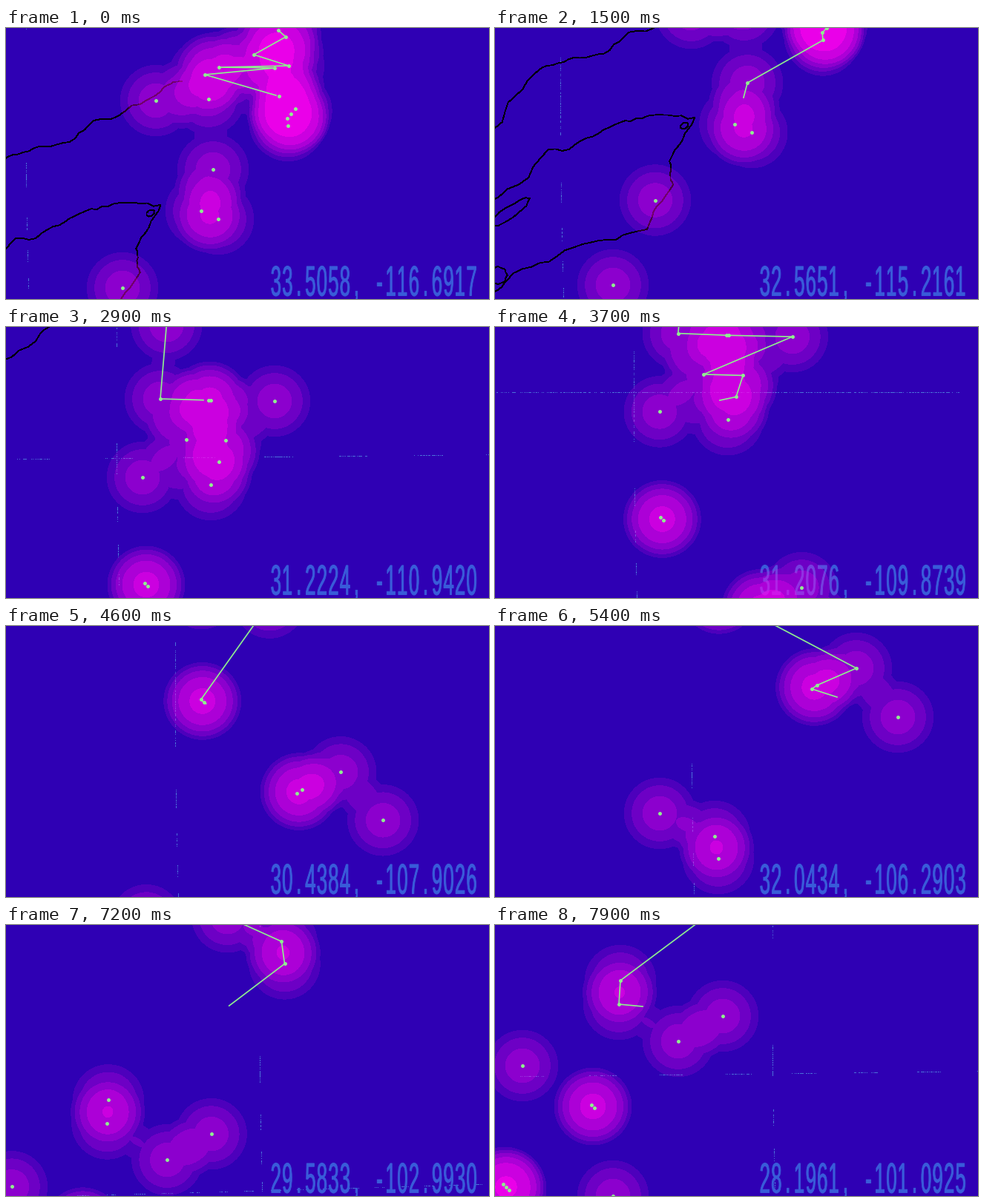
A matplotlib script that plays this animation: 651x366 px, repeating every 8000 ms.

```python
import numpy as np
import matplotlib.pyplot as plt
from matplotlib.animation import FuncAnimation
from matplotlib.patches import PathPatch
from matplotlib.path import Path
from matplotlib.textpath import TextPath
from matplotlib.transforms import Affine2D

W, H, DPI = 651, 366, 64
FRAMES, STEP = 80, 100
PX = 72 / DPI
DEG = 96.5                      # pixels per degree of latitude
R = DEG * 180 / np.pi
CX, CY = W / 2, H / 4           # where the camera looks at the globe
REACH2, PEAK, LEVELS = 3215, 0.515, 7

BACK = "#2f00b4"
INK = "#395cd9"
GREEN = "#90ee90"
GRID = "#4b70d8"

# time, latitude and longitude of the traveller, and its place on screen
KEYS = [
    (0.0, 33.5058, -116.6917, 364, 91),
    (1.5, 32.5651, -115.2161, 335, 94),
    (2.9, 31.2224, -110.9420, 266, 98.7),
    (3.7, 31.2076, -109.8739, 303, 99),
    (5.4, 32.0434, -106.2903, 461, 96),
    (6.5, 30.1782, -104.6920, 326, 102),
    (7.9, 28.1961, -101.0925, 199, 110),
]

# stops on screen at the given key: x, y and, for a close row, count and step
STOPS = {
    0: [(367, 3), (377, 12), (334, 36), (381, 51), (287, 53), (362, 54),
        (268, 63), (368, 92), (273, 96), (202, 98), (390, 109, 3, -5.5, 6.5),
        (380, 132), (279, 191), (263, 247), (286, 258), (157, 351)],
    1: [(159, 347)],
    2: [(208, 97), (273, 99), (276, 99), (362, 100), (243, 152), (296, 153),
        (287, 182), (184, 203), (276, 213), (187, 346, 2)],
    4: [(487, 57), (434, 80), (427, 85), (543, 123), (222, 253), (296, 284),
        (301, 314)],
    6: [(169, 75), (167, 107), (307, 123), (247, 157), (37, 190),
        (130, 243, 2), (11, 350, 3), (159, 366)],
}


def row(x, y, n=1, dx=4, dy=4):
    return [(x + i * dx, y + i * dy) for i in range(n)]


def rough(pts, rng, depth=3, amp=0.07):
    """Fractal coast: push the middle of every piece sideways, repeatedly."""
    pts = np.array(pts, float)
    for _ in range(depth):
        d = np.diff(pts, axis=0)
        push = rng.normal(0, amp, (len(d), 1))
        mids = pts[:-1] + d / 2 + push * np.column_stack([-d[:, 1], d[:, 0]])
        pts = np.insert(pts, np.arange(1, len(pts)), mids, axis=0)
    return pts


def island(x, y, a, b, tilt):
    u = np.linspace(0, 2 * np.pi, 9)
    z = (a * np.cos(u) + 1j * b * np.sin(u)) * np.exp(1j * np.radians(tilt))
    return np.column_stack([x + z.real, y + z.imag])


def project(lat, lon, cam):
    lat, lat0 = np.radians(lat), np.radians(cam[0])
    d = np.radians(lon - cam[1])
    north = np.sin(lat) * np.cos(lat0) - np.cos(lat) * np.sin(lat0) * np.cos(d)
    return CX + R * north, CY + R * np.cos(lat) * np.sin(d)


def unproject(xy, cam):
    x, y = np.asarray(xy, float).T
    north, east, lat0 = (x - CX) / R, (y - CY) / R, np.radians(cam[0])
    depth = np.sqrt(1 - north**2 - east**2)
    lat = np.arcsin(north * np.cos(lat0) + depth * np.sin(lat0))
    lon = np.arctan2(east, depth * np.cos(lat0) - north * np.sin(lat0))
    return np.column_stack([np.degrees(lat), cam[1] + np.degrees(lon)])


def aim(lat, lon, x, y):
    """Camera that shows the given place at pixel x, y."""
    cam = np.array([lat, lon])
    for _ in range(20):
        px, py = project(lat, lon, cam)
        cam += (px - x) / DEG, (py - y) / (DEG * np.cos(np.radians(lat)))
    return cam


times = np.array([k[0] for k in KEYS])
heads = np.array([k[1:3] for k in KEYS])
cams = np.array([aim(*k[1:]) for k in KEYS])
stops = np.vstack([unproject(row(*s), cams[k]) for k in STOPS for s in STOPS[k]])

rng = np.random.default_rng(4)
north_coast = [(-61, 257), (2, 174), (60, 160), (118, 125), (200, 92), (237, 72)]
south_coast = [(-20, 246), (72, 164), (140, 142), (198, 122), (269, 121),
               (235, 180), (240, 212), (205, 272), (118, 292), (25, 331),
               (-10, 364), (-90, 425)]
coasts = [unproject(rough(north_coast, rng), cams[0])] + [
    unproject(rough(pts, rng, depth), cams[1]) for pts, depth in [
        (south_coast, 3),
        (island(20, 249, 33, 8, -35), 1),
        (island(4, 334, 13, 12, 0), 1),
        (island(255, 132, 6, 4, -30), 1)]]

# the trail visits everything from west to east
trail = np.vstack([stops, heads])
trail = trail[np.argsort(trail[:, 1], kind="stable")]
legs = np.diff(trail, axis=0) * [1, 0.857]
dist = np.r_[0, np.cumsum(np.hypot(*legs.T))]
marks = dist[[np.flatnonzero((trail == h).all(axis=1))[0] for h in heads]]


def travel(t):
    s = np.interp(t, times, marks)
    return s, np.interp(s, dist, trail[:, 0]), np.interp(s, dist, trail[:, 1])


def soft_lon(t):
    return travel(t + np.linspace(-0.2, 0.1, 13))[2].mean()


lag = cams[:, 1] - [soft_lon(t) for t in times]


def camera(t):
    return (np.interp(t, times, cams[:, 0]),
            soft_lon(t) + np.interp(t, times, lag))


def heat_map(xs, ys):
    clear = np.ones((H, W))
    reach = int(REACH2**0.5) + 1
    for x, y in zip(xs, ys):
        x0, x1 = max(int(x) - reach, 0), min(int(x) + reach + 2, W)
        y0, y1 = max(int(y) - reach, 0), min(int(y) + reach + 2, H)
        if x0 >= x1 or y0 >= y1:
            continue
        cols, rows = np.arange(x0, x1) + 0.5, np.arange(y0, y1)[:, None] + 0.5
        r2 = (cols - x)**2 + (rows - y)**2
        clear[y0:y1, x0:x1] *= 1 - PEAK * np.clip(1 - r2 / REACH2, 0, 1)
    rgba = np.empty((H, W, 4))
    rgba[..., :3] = 1, 0, 0.94
    rgba[..., 3] = np.minimum(np.floor((1 - clear) * LEVELS) / 6.6, 1)
    return rgba


grain = rng.random(W) < 0.6


def broken(pos):
    """Hairline that only shows where it runs close to a pixel centre."""
    return (np.abs(pos % 1 - 0.5) < 0.2) & grain[:len(pos)]


def grid_pixels(cam):
    rows, cols = np.arange(H), np.arange(W)
    px, py = project(30.0, cam[1] + np.linspace(-3, 6, 60), cam)
    x = np.interp(rows, py, px)
    keep = broken(x)
    xs, ys = [np.floor(x[keep])], [rows[keep]]
    for lon in (-120, -110, -100):
        px, py = project(cam[0] + np.linspace(-5, 5, 60), lon, cam)
        y = np.interp(cols, px, py)
        keep = broken(y)
        xs.append(cols[keep])
        ys.append(np.floor(y[keep]))
    return np.concatenate(xs) + 0.5, np.concatenate(ys) + 0.5


def glyph(ch):
    path = TextPath((0, 0), ch, size=57.5, prop={"family": "Liberation Sans"})
    box = path.get_extents()
    mid = (box.x0 + box.x1) / 2
    return path.transformed(Affine2D().translate(-mid, 0).scale(0.45, -1))


GLYPHS = {ch: glyph(ch) for ch in "0123456789.,-"}


def label_path(text, left=356, base=361.5, pitch=15.52):
    verts, codes = [], []
    for i, ch in enumerate(text):
        if ch in GLYPHS:
            g = GLYPHS[ch]
            verts.append(g.vertices + [left + (i + 0.5) * pitch, base])
            codes.append(g.codes)
    return Path(np.concatenate(verts), np.concatenate(codes))


fig = plt.figure(figsize=(W / DPI, H / DPI), dpi=DPI, facecolor=BACK)
ax = fig.add_axes([0, 0, 1, 1])
ax.axis("off")

grid, = ax.plot([], [], ",", color=GRID, zorder=1)
shores = [ax.plot([], [], color="black", lw=0.8 * PX, antialiased=False, zorder=2)[0]
          for _ in coasts]
label = ax.add_patch(PathPatch(label_path("0"), fc=INK, ec=INK, lw=0.9 * PX, zorder=3))
heat = ax.imshow(np.zeros((H, W, 4)), extent=(0, W, H, 0), aspect="auto",
                 interpolation="nearest", zorder=4)
line, = ax.plot([], [], color=GREEN, lw=1.7 * PX, solid_joinstyle="round", zorder=5)
dots, = ax.plot([], [], "o", color=GREEN, ms=5 * PX, mew=0, zorder=6)
ax.set_xlim(0, W)
ax.set_ylim(H, 0)


def draw(i):
    t = i * STEP / 1000
    cam = camera(t)
    s, lat, lon = travel(t)

    grid.set_data(*grid_pixels(cam))
    for shore, pts in zip(shores, coasts):
        shore.set_data(*project(*pts.T, cam))
    label.set_path(label_path(f"{lat:.4f}, {lon:.4f}"))

    xs, ys = project(*stops.T, cam)
    heat.set_data(heat_map(xs, ys))
    dots.set_data(xs, ys)

    done = np.vstack([trail[dist < s], [lat, lon]])
    line.set_data(*project(*done.T, cam))
    return [grid, *shores, label, heat, line, dots]


anim = FuncAnimation(fig, draw, frames=FRAMES, interval=STEP, repeat=True,
                     repeat_delay=0, blit=False)
plt.show()
```
